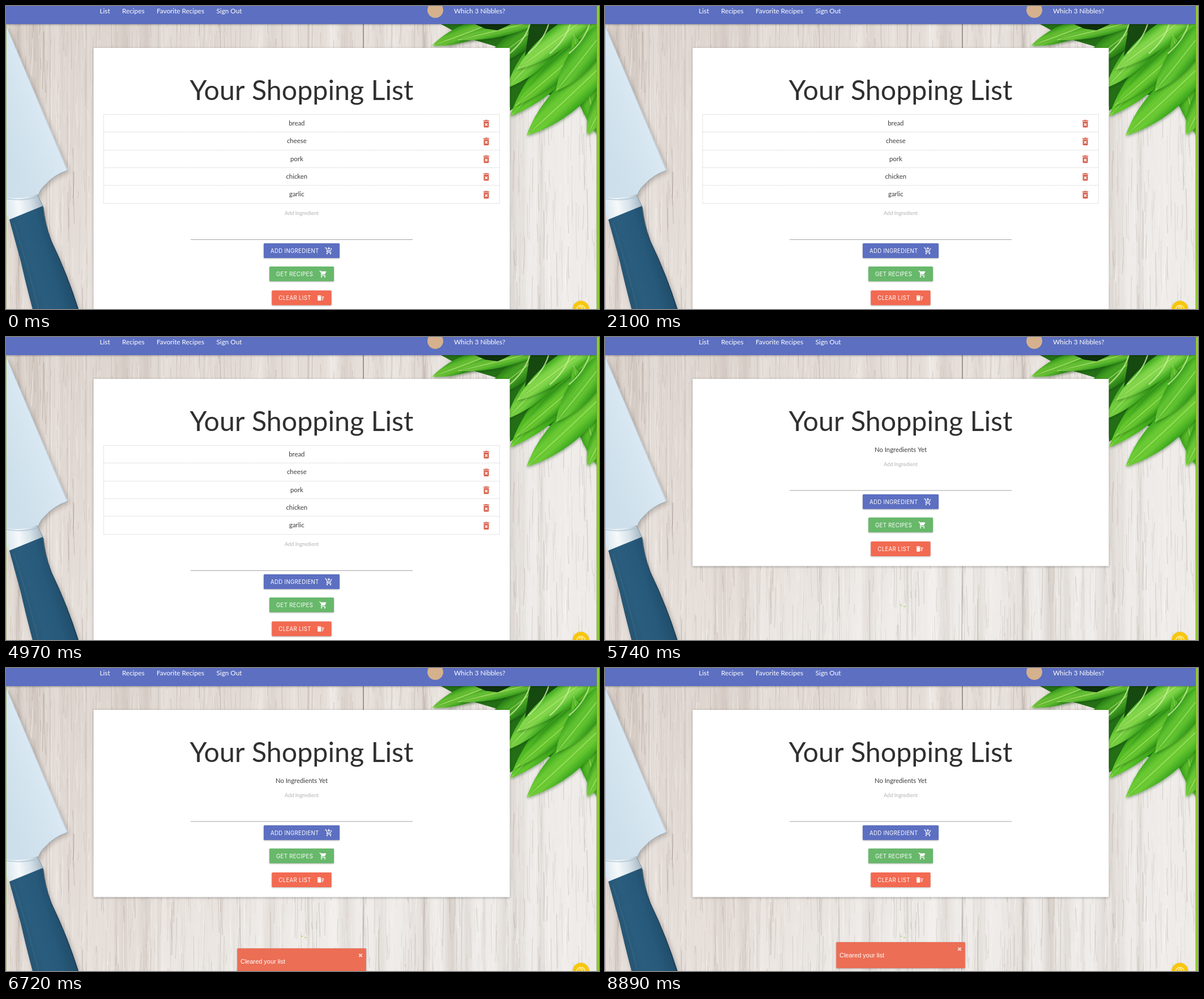
Recreate the animation shown at these times as an HTML page with a canvas. Size 1047 by 535 pixels, loop 8960 ms.

```html
<!DOCTYPE html>
<html lang="en">
<head>
<meta charset="utf-8">
<title>Shopping list</title>
<style>
html, body { margin: 0; width: 100%; height: 100%; overflow: hidden; background: #e2dbd5; }
canvas { display: block; width: 1047px; height: 535px; }
</style>
</head>
<body>
<canvas id="stage" width="1047" height="535"></canvas>
<script>
const W = 1047, H = 535, LOOP = 8960;
const CLEAR_AT = 5670, TOAST_IN = 5760, TOAST_OUT = 8700;
const LIST_SHIFT = 141.3;
const ITEMS = ['bread', 'cheese', 'pork', 'chicken', 'garlic'];
const BODY = 'Lato, sans-serif';

const WHEELS = 'M7 18c-1.1 0-1.99.9-1.99 2S5.9 22 7 22s2-.9 2-2-.9-2-2-2zM17 18c-1.1 0-1.99.9-1.99 2s.89 2 1.99 2 2-.9 2-2-.9-2-2-2z';
const ICONS = {
  trash: 'M6 19c0 1.1.9 2 2 2h8c1.1 0 2-.9 2-2V7H6v12zm2.46-7.12l1.41-1.41L12 12.59l2.12-2.12 1.41 1.41L13.41 14l2.12 2.12-1.41 1.41L12 15.41l-2.12 2.12-1.41-1.41L10.59 14l-2.13-2.12zM15.5 4l-1-1h-5l-1 1H5v2h14V4z',
  cart: WHEELS + 'M1 2v2h2l3.6 7.59-1.35 2.45c-.16.28-.25.61-.25.96 0 1.1.9 2 2 2h12v-2H7.42c-.14 0-.25-.11-.25-.25l.03-.12.9-1.63h7.45c.75 0 1.41-.41 1.75-1.03l3.58-6.49c.08-.14.12-.31.12-.48 0-.55-.45-1-1-1H5.21l-.94-2H1z',
  addCart: WHEELS + 'M11 9h2V6h3V4h-3V1h-2v3H8v2h3zM7.17 14.75l.03-.12.9-1.63h7.45c.75 0 1.41-.41 1.75-1.03l3.86-7.01L19.42 4l-3.87 7H8.53L4.27 2H1v2h2l3.6 7.59-1.35 2.45c-.16.28-.25.61-.25.96 0 1.1.9 2 2 2h12v-2H7.42c-.13 0-.25-.11-.25-.25z',
  sweep: 'M15 16h4v2h-4zM15 8h7v2h-7zM15 12h6v2h-6zM3 18c0 1.1.9 2 2 2h6c1.1 0 2-.9 2-2V8H3zM14 5h-3l-1-1H6L5 5H2v2h12z'
};
for (const key in ICONS) ICONS[key] = new Path2D(ICONS[key]);

let g;
let seed = 41;
const rand = (a = 0, b = 1) => {
  seed = (seed * 1664525 + 1013904223) % 4294967296;
  return a + (b - a) * seed / 4294967296;
};

function layer(paint) {
  const c = document.createElement('canvas');
  c.width = W;
  c.height = H;
  g = c.getContext('2d');
  paint();
  return c;
}

function gradient(x0, y0, x1, y1, ...colors) {
  const fill = g.createLinearGradient(x0, y0, x1, y1);
  colors.forEach((c, i) => fill.addColorStop(i / (colors.length - 1), c));
  return fill;
}

function shape(d, fill) {
  g.fillStyle = fill;
  g.fill(new Path2D(d));
}

function line(d, color, width) {
  g.strokeStyle = color;
  g.lineWidth = width;
  g.stroke(new Path2D(d));
}

function disc(x, y, r, fill) {
  g.fillStyle = fill;
  g.beginPath();
  g.arc(x, y, r, 0, 7);
  g.fill();
}

function shadow(color, blur, x, y) {
  g.shadowColor = color;
  g.shadowBlur = blur;
  g.shadowOffsetX = x;
  g.shadowOffsetY = y;
}
const noShadow = () => shadow('transparent', 0, 0, 0);

function box(x, y, w, h, fill, radius = 0) {
  g.fillStyle = fill;
  g.beginPath();
  g.roundRect(x, y, w, h, radius);
  g.fill();
}

function text(str, x, y, size, color, align = 'left', family = BODY, spacing = 0) {
  g.font = `${size}px ${family}`;
  g.letterSpacing = spacing + 'px';
  g.textAlign = align;
  g.fillStyle = color;
  g.fillText(str, x, y);
}

function icon(name, cx, cy, size, color) {
  g.save();
  g.translate(cx - size / 2, cy - size / 2);
  g.scale(size / 24, size / 24);
  g.fillStyle = color;
  g.fill(ICONS[name], 'evenodd');
  g.restore();
}

function wood() {
  g.fillStyle = gradient(0, 0, W * .45, H, '#d9d0c9', '#e0d8d2', '#e6dfda', '#eeebe8');
  g.fillRect(0, 0, W, H);
  for (let i = 0; i < 50; i++) {
    const x = rand(0, W), w = rand(6, 40);
    const tone = rand() < .4 ? '165,148,136' : '250,247,245';
    g.fillStyle = gradient(x, 0, x + w, 0, `rgba(${tone},0)`, `rgba(${tone},.18)`, `rgba(${tone},0)`);
    g.fillRect(x, 0, w, H);
  }
  for (let i = 0; i < 2600; i++) {
    const x = rand(0, W), y = rand(-80, H), len = rand(12, 110);
    const color = rand() < .5 ? `rgba(128,110,98,${rand(.05, .24)})` : `rgba(255,252,250,${rand(.1, .45)})`;
    line(`M${x} ${y}q${rand(-2, 2)} ${len / 2} ${rand(-2.5, 2.5)} ${len}`, color, rand(.4, 1.4));
  }
  for (const x of [78, 378, 414, 541, 736, 806]) {
    line(`M${x} 25q${rand(-5, 5)} 260 ${rand(-3, 3)} 515`, 'rgba(105,90,82,.22)', 1);
  }
  line('M631 30L631 80', 'rgba(75,65,60,.75)', 1.2);
  line('M631 400L630 535', 'rgba(105,95,90,.55)', 1);
}

function knife() {
  const blade = 'M0 33L109 290Q85 298 70 315Q57 327 56 340L0 344Z';
  const handle = 'M6 377L65 353Q68 385 80 415Q109 475 128 535L47 535Q35 490 26 450Z';
  shadow('rgba(80,70,65,.35)', 8, 3, 3);
  shape(blade, '#d6e6f0');
  shape(handle, '#27597a');
  noShadow();
  shape(blade, gradient(0, 250, 90, 215, '#cddfeb', '#d3e4ef', '#dceaf4'));
  line('M1 36L108 290', 'rgba(110,130,140,.4)', .8);
  line('M109 290Q85 298 70 315Q57 327 56 340', 'rgba(120,140,150,.5)', 1.1);
  shape('M0 338Q30 342 56 332L66 354L6 378L0 366Z', gradient(0, 350, 64, 340, '#dbe8f0', '#f6f9fb', '#d5e1e9', '#a3b4bf'));
  line('M0 340Q32 345 55 337', 'rgba(160,190,208,.6)', 2);
  line('M55 333L66 354', '#8999a2', 1);
  shape(handle, gradient(12, 440, 95, 415, '#27536f', '#2a5d7e', '#27597a', '#1f4b68'));
  line('M66 355Q69 385 80 415Q109 475 127 535', 'rgba(20,45,62,.5)', 1.5);
  line('M14 383Q38 455 57 535', 'rgba(70,122,155,.3)', 2);
}

function leaf(x0, y0, x1, y1, width, dark, light) {
  const len = Math.hypot(x1 - x0, y1 - y0);
  g.save();
  g.translate(x0, y0);
  g.rotate(Math.atan2(y1 - y0, x1 - x0));
  const w = width / 2;
  shadow('rgba(10,60,5,.4)', 5, 1, 2);
  shape(`M0 0C${len * .3} ${-w * 1.5} ${len * .7} ${-w * 1.3} ${len} 0C${len * .72} ${w * 1.3} ${len * .3} ${w * 1.5} 0 0Z`,
    gradient(0, -w, 0, w, dark, light, light, dark));
  noShadow();
  line(`M0 0Q${len / 2} -2 ${len} 0`, 'rgba(196,238,135,.6)', 1.4);
  for (const k of [-.8, -.4, .4, .8]) {
    line(`M4 0Q${len * .5} ${k * w} ${len * .96} 0`, 'rgba(30,110,10,.14)', .8);
  }
  g.restore();
}

function leaves() {
  shape('M768 32L1043 32L1043 190L1000 165L935 152L890 185L880 76L810 55Z', '#246f16');
  leaf(985, 0, 838, 112, 40, '#237a13', '#46a223');
  leaf(884, 20, 752, 70, 29, '#2f9417', '#66bf33');
  leaf(958, 20, 798, 60, 24, '#35991b', '#69c236');
  shape('M828 32L892 32L868 43L846 40Z', '#0e300c');
  leaf(1060, 15, 890, 195, 52, '#33a015', '#5ec629');
  leaf(1010, 10, 884, 145, 42, '#37a01c', '#74cf3f');
  leaf(1068, 30, 900, 176, 35, '#2c9217', '#66c72f');
  shape('M925 32L983 32L950 68L915 96Z', '#15490f');
  leaf(1050, 0, 902, 112, 38, '#41ac20', '#85d84c');
  leaf(1002, 50, 1046, 230, 40, '#2f9818', '#5abd29');
  leaf(1076, 82, 919, 229, 49, '#3aa61c', '#6ccb34');
  leaf(1075, 18, 971, 150, 44, '#32991a', '#62c431');
  leaf(1080, 118, 1026, 228, 34, '#349a1b', '#6fca37');
  for (const x of [925, 958, 996, 1030]) {
    line(`M${x} 32q-8 28 -36 52`, 'rgba(206,240,160,.75)', 2.4);
  }
}

function chrome() {
  shadow('rgba(0,0,0,.32)', 3, 0, 1);
  box(0, -5, 1043, 37, '#5c6fc1');
  noShadow();
  const nav = [['List', 165.5], ['Recipes', 205], ['Favorite Recipes', 266], ['Sign Out', 371.5], ['Which 3 Nibbles?', 791]];
  for (const [label, x] of nav) text(label, x, 12.5, 11.75, '#fff');
  disc(758, 7, 14, '#d5b28d');
  box(0, 32, 1, H, '#a9bd82');
  box(1043, 0, 4, H, '#90ce2b');
  box(1042.5, 0, .8, H, 'rgba(70,90,50,.45)');
}

function helpBadge() {
  shadow('rgba(0,0,0,.2)', 3, 0, 1);
  disc(1015, 535, 14.5, '#f7c70f');
  noShadow();
  line('M1007.5 536a7.5 7.5 0 0 1 15 0', '#fff0b0', 1.5);
  line('M1012.3 533.5q.2-2.6 2.8-2.6q2.8.2 2.5 2.7L1015 536', '#fff0b0', 1.4);
}

function button(label, x, y, w, color, name) {
  shadow('rgba(0,0,0,.3)', 2.5, 0, 1);
  box(x, y, w, 26, color, 1.5);
  noShadow();
  text(label, x + 12, y + 17, 9.65, '#fff', 'left', 'Inter, sans-serif', .33);
  icon(name, x + w - 19, y + 13.2, 14.5, '#fff');
}

function card(empty) {
  const dy = empty ? -LIST_SHIFT : 0;
  shadow('rgba(0,0,0,.32)', 4, 0, 1);
  box(154.5, 74, 735, empty ? 330.5 : 480, '#fff', 1);
  noShadow();
  text('Your Shopping List', 522, 165.5, 48.4, '#303030', 'center');
  if (empty) {
    text('No Ingredients Yet', 522, 203, 11.35, '#3c3c3c', 'center');
  } else {
    const row = 31.35;
    g.setLineDash([1.5, .8]);
    for (let i = 0; i <= 5; i++) {
      const y = Math.round(191 + i * row) + .5;
      line(`M172 ${y}H872`, '#d8d8d8', 1);
    }
    line('M172.5 191V348M871.5 191V348', '#d8d8d8', 1);
    g.setLineDash([]);
    ITEMS.forEach((item, i) => {
      text(item, 513.3, 210.8 + i * row, 11.4, '#3c3c3c', 'center');
      icon('trash', 848, 207.8 + i * row, 18, '#d9624f');
    });
  }
  text('Add Ingredient', 522, 369 + dy, 9.25, '#b4b4b4', 'center');
  box(326, 411.9 + dy, 392, 1, '#a4a4a4');
  button('ADD INGREDIENT', 455, 419.1 + dy, 134, '#5c6fc1', 'addCart');
  button('GET RECIPES', 465, 460.1 + dy, 114, '#68b86b', 'cart');
  button('CLEAR LIST', 469.3, 502.3 + dy, 105.3, '#f26a51', 'sweep');
}

function specks() {
  line('M521 473l3 1.2M527 475.5l3 .6', '#a5d45a', 1.5);
}

function toastTop(t) {
  const rest = 495, hidden = 545, lift = 11;
  if (t < TOAST_IN) return hidden;
  const u = (t - TOAST_IN) / 120;
  if (u < 4) return rest + (hidden - rest) * Math.exp(-1.6 * u) * Math.cos(u * 2.4);
  if (t < TOAST_OUT) return rest;
  const p = Math.min(1, (t - TOAST_OUT) / 190);
  return rest - lift * p * p * (3 - 2 * p);
}

function toast(t) {
  const y = toastTop(t);
  if (y >= H) return;
  shadow('rgba(0,0,0,.3)', 3, 0, 1);
  box(408.3, y, 227.5, 46, '#eb6e55', 1);
  noShadow();
  text('Cleared your list', 414, y + 27, 10.95, '#fff', 'left', '"Liberation Sans", sans-serif');
  text('✖', 626, y + 15.5, 10, '#f9d5cd', 'center', '"DejaVu Sans", sans-serif');
}

function page(empty) {
  return layer(() => {
    g.drawImage(backdrop, 0, 0);
    card(empty);
    if (empty) specks();
    chrome();
    helpBadge();
  });
}

const backdrop = layer(() => {
  wood();
  knife();
  leaves();
});
const fullPage = page(false);
const emptyPage = page(true);
const stage = document.getElementById('stage').getContext('2d');

function frame(now) {
  const t = now % LOOP;
  g = stage;
  g.drawImage(t < CLEAR_AT ? fullPage : emptyPage, 0, 0);
  toast(t);
  requestAnimationFrame(frame);
}
frame(0);
</script>
</body>
</html>
```
